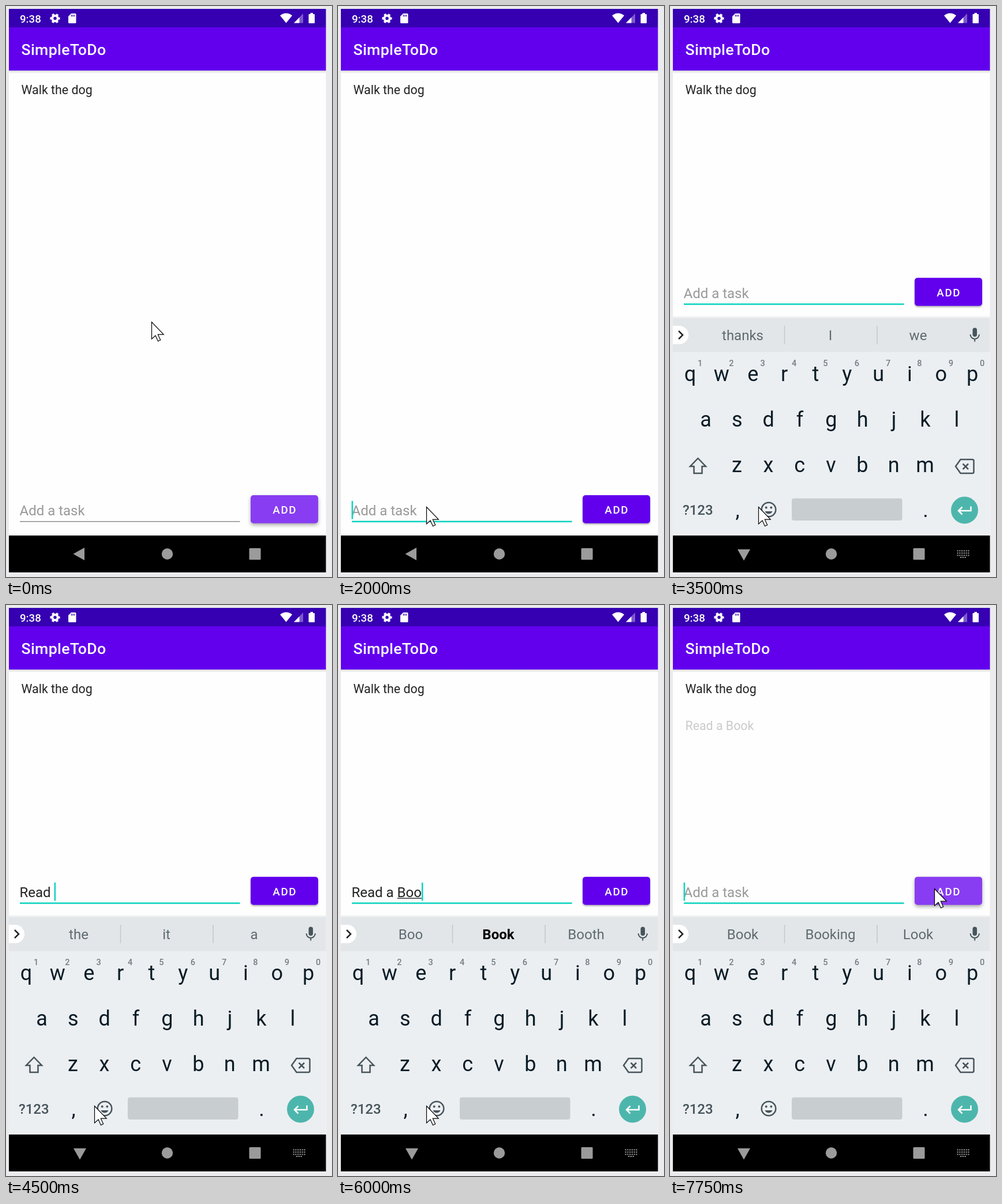
Animation, 565 px wide and 991 px high, one loop 8 s. Source, as an HTML page:

```html
<!DOCTYPE html>
<html lang="en">
<head>
<meta charset="utf-8">
<title>To-do list</title>
<style>
  html, body { margin: 0; height: 100%; overflow: hidden; background: #ebebed; }
  svg { display: block; }
  text { font-family: Roboto, sans-serif; font-size: 24px; white-space: pre; }
  .mid { text-anchor: middle; }
  .medium { font-weight: 500; fill: #fff; }
  .item { font-size: 21.37px; fill: #222; }
  .key { font-size: 36px; fill: #0a1c26; }
  .digit { font-size: 14.5px; font-weight: 500; fill: #737c81; }
  .word { fill: #5f6a70; }
  .word.bold { font-weight: 700; fill: #000; }
  .icon { fill: none; stroke: #46545b; stroke-width: 2.5; }
  #button { filter: drop-shadow(0 2px 1.5px rgba(0, 0, 0, .3)); }
  #button.pressed { filter: drop-shadow(0 3px 3px rgba(0, 0, 0, .35)); }
</style>
</head>
<body>
<svg width="565" height="991" viewBox="0 0 565 991">
  <defs>
    <linearGradient id="shade" x2="0" y2="1">
      <stop stop-color="#000" stop-opacity=".16"/>
      <stop offset="1" stop-color="#000" stop-opacity="0"/>
    </linearGradient>
  </defs>
  <rect x="5" y="5" width="549.5" height="978" fill="#fefefe"/>

  <!-- status bar and title -->
  <rect x="5" y="5" width="549.5" height="32.5" fill="#3600b2"/>
  <rect x="5" y="37" width="549.5" height="75" fill="#6200ee"/>
  <rect x="5" y="112" width="549.5" height="5" fill="url(#shade)"/>
  <text class="medium" x="24" y="28.5" style="font-size:18.7px">9:38</text>
  <g fill="none" stroke="#fff">
    <circle cx="85" cy="21.5" r="4.7" stroke-width="4"/>
    <circle cx="85" cy="21.5" r="7.2" stroke-width="2.8" stroke-dasharray="4 3.54" stroke-dashoffset="2"/>
  </g>
  <path d="M113 13h7q1.5 0 1.5 1.5v14q0 1.5-1.5 1.5h-10.500q-1.500 0-1.500-1.500V18z" fill="#fff"/>
  <path d="M113.500 15v3.500M116 15v3.500M118.500 15v3.500" stroke="#3600b2" stroke-width="1.200"/>
  <path d="M475 16.500Q485.500 8.500 496 16.500L485.500 29.500z" fill="#fff"/>
  <path d="M499 29.500L515 13v16.500z" fill="#fff" opacity=".35"/>
  <path d="M499 29.500L508.500 19.700v9.800z" fill="#fff"/>
  <path d="M527.500 14v-2h4.500v2h2q1 0 1 1v14q0 1-1 1h-8.500q-1 0-1-1V15q0-1 1-1z" fill="#fff"/>
  <text class="medium" x="26.5" y="85" style="font-size:26.7px;letter-spacing:.33px">SimpleToDo</text>

  <text class="item" x="26.500" y="153">Walk the dog</text>
  <text class="item" x="26.500" y="217" id="newItem" opacity=".23">Read a Book</text>

  <g id="editor">
    <text id="entry" x="23.500" y="884"><tspan id="done"></tspan><tspan id="composing"></tspan></text>
    <rect id="underline" y="885.500" height="1.500" fill="#333"/>
    <rect id="line" x="24" width="381.500"/>
    <rect id="caret" y="859" width="2.600" height="31.500" fill="#12d3c1"/>
    <rect id="button" x="424" y="849" width="117" height="48.700" rx="5"/>
    <text class="medium mid" x="483.300" y="881" style="font-size:18.7px;letter-spacing:1.67px">ADD</text>
  </g>

  <g id="keyboard">
    <rect x="5" y="538.500" width="549.500" height="3" fill="#f1f2f3"/>
    <rect x="5" y="541" width="549.500" height="378" fill="#eceff2"/>
    <rect x="5" y="541.500" width="549.500" height="59" fill="#e2e6e9"/>
    <path d="M5 555h11a16 16 0 0 1 0 32H5z" fill="#fff"/>
    <path d="M15 564l7 7-7 7" class="icon" style="stroke:#222"/>
    <path d="M198.500 555v32M359 555v32" stroke="#c3c8cc" stroke-width="1.500"/>
    <rect x="524.500" y="558.500" width="7.500" height="15.500" rx="3.750" fill="#46545b"/>
    <path d="M520.500 570a7.700 7.700 0 0 0 15.400 0M528.200 577.500v5" class="icon" style="stroke-width:2"/>
    <g id="words"></g>
    <g id="keys"></g>
    <text x="22" y="883" font-weight="500" fill="#46545b">?123</text>
    <path d="M48.500 785L62 799h-6.500v12h-14v-12H35z" class="icon"/>
    <path d="M503.500 787H524q2.500 0 2.500 2.500v19q0 2.500-2.500 2.500h-20.500L495 799z" class="icon"/>
    <path d="M507.500 794.500l9.500 9.500m0-9.500l-9.500 9.500" class="icon"/>
    <circle cx="171" cy="874" r="12.300" class="icon"/>
    <path d="M164.500 877a7 7 0 0 0 13 0z" fill="#46545b"/>
    <circle cx="166.700" cy="870.500" r="1.900" fill="#46545b"/>
    <circle cx="175.300" cy="870.500" r="1.900" fill="#46545b"/>
    <rect x="211" y="854.500" width="191.500" height="38.500" rx="4" fill="#c8cdd0"/>
    <circle cx="510.500" cy="875" r="23.500" fill="#4db6ac"/>
    <path d="M521.500 868.500v7.500H500m6.500-6.500l-6.500 6.500 6.500 6.500" class="icon" style="stroke:#fff"/>
  </g>

  <!-- navigation bar -->
  <rect x="5" y="919" width="549.500" height="64" fill="#000"/>
  <g fill="#9b9b9b">
    <path id="back"/>
    <circle cx="279.500" cy="951" r="9.700"/>
    <rect x="421.500" y="941" width="20" height="20" rx="1.500"/>
    <path id="switcher" d="M497.500 945.500h21M497.500 949.500h21M497.500 953.500h21M503 957h10" stroke="#9b9b9b" stroke-width="2" stroke-dasharray="2.200 1.560"/>
  </g>

  <path id="pointer" d="M.500.500v29.500l6.500-6 4.500 9.700 4.200-1.900-4.400-9.600h9.900z" fill="#fff" stroke="#000" stroke-width="1.200"/>
</svg>
<script>
const LOOP = 8000;
const $ = id => document.getElementById(id);
const setAttrs = (el, attrs) => {
  for (const name in attrs) el.setAttribute(name, attrs[name]);
};

function addText(parent, className, x, y, content = "") {
  const el = document.createElementNS("http://www.w3.org/2000/svg", "text");
  setAttrs(el, { class: className, x, y });
  el.textContent = content;
  $(parent).append(el);
  return el;
}

const addRow = (className, content, x, y) =>
  [...content].forEach((c, i) => addText("keys", className + " mid", x + 54.35 * i, y, c));

addRow("key", "qwertyuiop", 35, 651);
addRow("digit", "1234567890", 52, 625);
addRow("key", "asdfghjkl", 62, 730);
addRow("key", "zxcvbnm", 116, 809);
addText("keys", "key mid", 117, 887, ",");
addText("keys", "key mid", 443, 887, ".");
const words = [126, 278, 430].map(x => addText("words", "word mid", x, 580));

// Each step changes some properties from its time on.
const steps = [
  [0, { pointer: [252, 548], pressed: true, focus: false, keyboard: false, caret: false,
        done: "", composing: "", words: "thanks I we", bold: false, added: false }],
  [500, { pointer: [181, 278] }],
  [750, { pointer: [154, 216] }],
  [1000, { pointer: [137, 789] }],
  [1250, { pointer: [146, 871] }],
  [1500, { pointer: [151, 872] }],
  [1750, { pointer: [153, 869] }],
  [2000, { pressed: false, focus: true, caret: true }],
  [2500, { keyboard: true, caret: false }],
  [3000, { caret: true }],
  [3500, { caret: false }],
  [4000, { caret: true, composing: "R", words: "R Right Re" }],
  [4250, { composing: "Rea", words: "Rea Read Ready" }],
  [4500, { done: "Read ", composing: "", words: "the it a" }],
  [4750, { composing: "a", words: "a and as" }],
  [5000, { done: "Read a ", composing: "", words: "book good few" }],
  [5500, { caret: false }],
  [5750, { caret: true, composing: "B", words: "B Book But", bold: true }],
  [6000, { composing: "Boo", words: "Boo Book Booth" }],
  [6250, { composing: "Book", words: "Book Booking Look", bold: false }],
  [6750, { caret: false, pointer: [175, 687] }],
  [7000, { pointer: [401, 451] }],
  [7250, { caret: true, pointer: [458, 484] }],
  [7500, { pointer: [458, 492] }],
  [7750, { done: "", composing: "", pressed: true, added: true }]
];

const show = (id, on) => setAttrs($(id), { visibility: on ? "visible" : "hidden" });

function render(time) {
  const s = Object.assign({}, ...steps.filter(([at]) => at <= time).map(([, change]) => change));
  const typed = s.done + s.composing;

  $("done").textContent = typed ? s.done : "Add a task";
  $("composing").textContent = s.composing;
  setAttrs($("entry"), { fill: typed ? "#222" : "#999" });
  const doneWidth = s.done ? $("done").getComputedTextLength() : 0;
  const composingWidth = s.composing ? $("composing").getComputedTextLength() : 0;
  setAttrs($("underline"), { x: 23.5 + doneWidth, width: composingWidth });
  setAttrs($("caret"), { x: 23.5 + doneWidth + composingWidth });
  setAttrs($("line"), s.focus
    ? { y: 893.5, height: 2.6, fill: "#12d3c1" }
    : { y: 894, height: 1.4, fill: "#858585" });
  setAttrs($("button"), { fill: s.pressed ? "#883df2" : "#6200ee", class: s.pressed ? "pressed" : "" });
  setAttrs($("editor"), { transform: `translate(0 ${s.keyboard ? -377.3 : 0})` });

  s.words.split(" ").forEach((word, i) => {
    words[i].textContent = word;
    words[i].classList.toggle("bold", s.bold && i === 1);
  });
  show("caret", s.caret);
  show("keyboard", s.keyboard);
  show("switcher", s.keyboard);
  show("newItem", s.added);
  setAttrs($("back"), { d: s.keyboard ? "M117 943h22l-11 19.500z" : "M116.500 951l19.500-11v22z" });
  setAttrs($("pointer"), { transform: `translate(${s.pointer})` });
}

const start = performance.now();
function tick() {
  render((performance.now() - start) % LOOP);
  requestAnimationFrame(tick);
}
tick();
</script>
</body>
</html>
```
